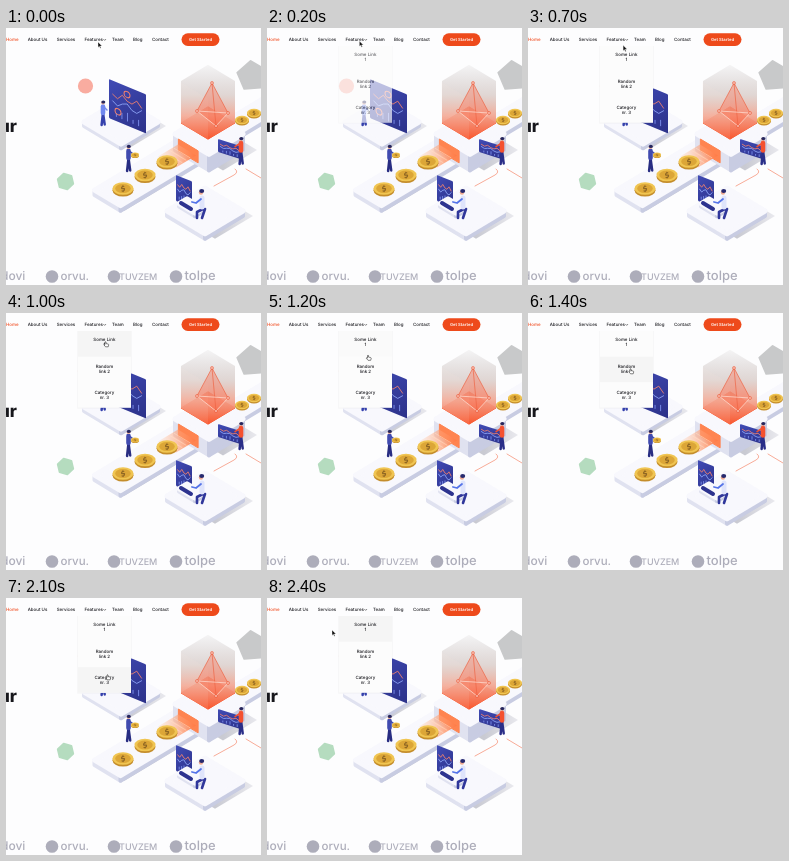
An HTML page for the animation above (2500 ms loop, 255 by 257 pixels).

```html
<!DOCTYPE html>
<html lang="en">
<head>
<meta charset="utf-8">
<title>Landing page menu</title>
<style>
  html, body { margin: 0; width: 100%; height: 100%; overflow: hidden; background: #fdfdfe; }
  svg { display: block; width: 100vw; height: 100vh; }
  text { font-family: Inter, "Open Sans", sans-serif; font-size: 4.45px; font-weight: 500; fill: #17171c; text-rendering: geometricPrecision; }
  .mid { text-anchor: middle; }
  .brand { fill: #adadba; font-weight: 500; }
</style>
</head>
<body>
<svg id="stage" viewBox="0 0 255 257" preserveAspectRatio="none">
  <defs>
    <linearGradient id="glow" x1="0" y1="0" x2="0" y2="1">
      <stop offset="0" stop-color="#b9b4b4" stop-opacity=".12"/>
      <stop offset=".4" stop-color="#cdbdb8" stop-opacity=".6"/>
      <stop offset=".68" stop-color="#f2a48f" stop-opacity=".9"/>
      <stop offset="1" stop-color="#f9572f"/>
    </linearGradient>
    <linearGradient id="heat">
      <stop offset="0" stop-color="#ffc9a8" stop-opacity=".2"/>
      <stop offset="1" stop-color="#ff7a45"/>
    </linearGradient>
    <linearGradient id="shade">
      <stop offset=".5" stop-color="#c9cad2"/>
      <stop offset="1" stop-color="#e9e9ee"/>
    </linearGradient>
    <linearGradient id="screen" x1="0" y1="0" x2="1" y2="1">
      <stop offset="0" stop-color="#414bb5"/>
      <stop offset="1" stop-color="#2b3189"/>
    </linearGradient>
  </defs>
  <g id="scene"></g>
  <g id="nav"></g>
  <g id="menu"></g>
  <g id="cursor">
    <path id="arrow" d="M0 0V5.4L1.3 4.3L2.2 6.3L3.1 5.9L2.2 4H4Z" fill="#111" stroke="#fff" stroke-width=".4"/>
    <path id="hand" transform="scale(.8)" d="M0 0Q.7-.7 1.3 0V2L4 2.6Q4.8 2.9 4.6 3.8L4 6H.7L-1.5 3.4Q-1.4 2.5-.6 2.8L0 3.3Z" fill="#fff" stroke="#222" stroke-width=".7"/>
  </g>
</svg>
<script>
const $ = id => document.getElementById(id);
const NS = "http://www.w3.org/2000/svg";
const SLOPE = .6;

function add(parent, tag, attrs, content) {
  const el = document.createElementNS(NS, tag);
  for (const key in attrs) el.setAttribute(key, attrs[key]);
  if (content) el.textContent = content;
  return parent.appendChild(el);
}
const scene = $("scene"), nav = $("nav"), menu = $("menu");
const range = n => [...Array(n).keys()];
const clamp = v => Math.max(0, Math.min(1, v));
const poly = (points, fill, round = 0) => add(scene, "polygon", {
  points: points.join(" "), fill, stroke: round ? fill : "none", "stroke-width": round, "stroke-linejoin": "round"
});
const line = (d, stroke, width = .6, parent = scene) => add(parent, "path", {
  d, stroke, "stroke-width": width, fill: "none", "stroke-linecap": "round", "stroke-linejoin": "round"
});
const dot = (cx, cy, rx, fill, ry = rx) => add(scene, "ellipse", { cx, cy, rx, ry, fill });
const label = (parent, x, y, content, more) => add(parent, "text", { x, y, ...more }, content);

// Isometric plane: u runs up to the right, v down to the right
const iso = (cx, cy, u, v) => [cx + u + v, cy + (v - u) * SLOPE];
const rhombus = (cx, cy, a, b = a) => [iso(cx, cy, -a, -b), iso(cx, cy, a, -b), iso(cx, cy, a, b), iso(cx, cy, -a, b)];
const lift = ([x, y], height) => [x, y - height];

function slab(cx, cy, a, b, depth, shadow = 0) {
  if (shadow) poly(rhombus(cx + shadow, cy + depth, a, b), "url(#shade)");
  const [left, , right, bottom] = rhombus(cx, cy, a, b);
  poly([left, bottom, lift(bottom, -depth), lift(left, -depth)], "#e0e2f0", 4);
  poly([right, bottom, lift(bottom, -depth), lift(right, -depth)], "#c8cce2", 4);
  poly(rhombus(cx, cy, a, b), "#f8f8fd", 5);
}

function blob(cx, cy, r, sides, turn, fill) {
  poly(range(sides).map(i => {
    const angle = turn + i * 2 * Math.PI / sides;
    return [cx + r * Math.cos(angle), cy + r * Math.sin(angle)];
  }), fill, 2);
}

function person(x, y, height, shirt, trousers, reach = -4) {
  const hip = y - height * .48, neck = y - height * .8;
  line(`M${x} ${hip}L${x - 1.4} ${y}M${x} ${hip}L${x + 1.7} ${y - .6}`, trousers, 2.5);
  line(`M${x} ${neck + 1.5}V${hip}`, shirt, 4.6);
  line(`M${x} ${neck + 1}l${reach} 4`, shirt, 1.5);
  dot(x, neck - 2.2, 1.8, "#f0aa91");
  dot(x + .3, neck - 3, 2, "#26275f", 1.6);
}

function coin(x, y, r = 10.5) {
  dot(x, y + r * .17, r, "#c48d2b", r * .6);
  dot(x, y, r, "#f0c552", r * .6);
  dot(x, y, r * .74, "#dca637", r * .43);
  add(scene, "text", {
    class: "mid", y: r * .26, transform: `translate(${x} ${y}) rotate(-28) skewX(-15)`,
    style: `font-size:${r * .7}px;font-weight:700;fill:#8c6423`
  }, "$");
}

// Upright screen with a wave chart and bars
function screen(x, y, w, h, slope) {
  const g = add(scene, "g", { transform: `matrix(1 ${slope} 0 1 ${x} ${y})` });
  add(g, "rect", { width: w, height: h, rx: 1, fill: "url(#screen)" });
  const wave = (level, speed) => "M" + range(7).map(i =>
    [w * (.1 + i * .13), h * (level + .08 * Math.sin(i * speed))]).join("L");
  line(wave(.35, 2.2), "#f0806f", .8, g);
  line(wave(.52, 1.7), "#8ea5f6", .8, g);
  range(5).forEach(i => line(`M${w * (.2 + i * .15)} ${h * .88}v${-h * (.08 + i % 3 * .06)}`, "#7f92ee", .8, g));
  return g;
}

function buildMachine() {
  slab(203, 106, 17, 17, 16, 14);
  const [left, , , bottom] = rhombus(203, 106, 17);
  const along = t => [left[0] + (bottom[0] - left[0]) * t, left[1] + (bottom[1] - left[1]) * t + 3];
  poly([along(.1), along(.68), lift(along(.68), -12), lift(along(.1), -12)], "#ff8450", 1);
  poly(rhombus(171, 128, 10, 9), "url(#heat)");
  range(4).forEach(i => {
    const step = -7 + i * 4;
    line(`M${iso(171, 128, step, -8)}L${iso(171, 128, step, 8)}`, "#ffe0cb", .5);
  });

  // Glowing prism with a wire crystal
  const base = rhombus(202, 95, 13.5);
  const [west, north, east, south] = base;
  poly(base, "#fb6038", 1);
  poly([west, lift(west, 42), lift(north, 42), lift(east, 42), east, south], "url(#glow)");
  range(14).forEach(i => line(`M${iso(202, 95, -13.5, i * 2 - 13.5)}v-40`, "#ffe7de", .2));
  const nodes = [[206, 55], [191, 83], [210, 98], [222, 85]];
  poly(nodes, "#ff4f2b").setAttribute("fill-opacity", .3);
  nodes.forEach((a, i) => nodes.slice(i + 1).forEach(b => line(`M${a}L${b}`, i ? "#ffe1d6" : "#ee6546", .7)));
  nodes.forEach(([x, y]) => { dot(x, y, 1.7, "#ed6041"); dot(x, y, .8, "#fff"); });
}

function buildScene() {
  blob(246, 48, 15, 5, -1.66, "#c8c9ca");
  blob(59.5, 153.5, 8, 6, -1.8, "#b5dcbf");
  dot(79.5, 58, 7.6, "#f9aca0");

  slab(115, 94, 18.5, 18.5, 4, 8);
  const board = screen(103, 51, 37, 39, .42);
  range(2).forEach(i => add(board, "circle", { cx: 9 + i * 9, cy: 29 - i * 21, r: 3, fill: "none", stroke: "#f0806f", "stroke-width": 1 }));
  person(97, 97, 25, "#7087ee", "#3541ad", 4);

  slab(246, 87, 22, 8, 5);
  range(2).forEach(i => coin(236 + i * 12, 92 - i * 7, 7));

  slab(143, 145, 41.5, 13, 5, 4);
  buildMachine();
  range(3).forEach(i => coin(117 + i * 22, 160.5 - i * 13.5));
  person(122.5, 143, 27, "#414baf", "#282d82", 5);
  coin(129, 127, 4);

  screen(212, 111, 24, 13, .32);
  person(235, 136, 28, "#f4512f", "#2a2e88", -6);
  line("M208 158L228 147Q233 144 229 141M240 141L255 150", "#f5886c", .7);

  slab(199, 183, 19, 19, 5, 10);
  screen(170, 147, 16, 26, .4);
  slab(185, 178, 4, 8, 3);
  line("M175 175L185 181", "#2d338f", 4);
  line("M197 181L191 184V190M199 181L196 190", "#30379b", 2.6);
  line("M196 170V179", "#dfe4fb", 5);
  line("M195 171L190 175L186 174", "#5574e8", 1.8);
  dot(195, 164.5, 2.2, "#efaa91");
  dot(195.7, 163, 2.5, "#26296f", 2.1);
}

function buildPage() {
  label(nav, 11, 103.5, "ur", { "text-anchor": "end", style: "font-size:17px;font-weight:800" });
  [["Home", 0], ["About Us", 21.7], ["Services", 50.7], ["Features", 78.5], ["Team", 106], ["Blog", 127], ["Contact", 146]]
    .forEach(([name, x], i) => label(nav, x, 13.2, name, i ? {} : { style: "fill:#f04e23" }));
  line("M97.6 11.3l1.1 1.1l1.1-1.1", "#333", .6, nav);
  add(nav, "rect", { x: 175.5, y: 5.3, width: 38, height: 12.6, rx: 6.3, fill: "#ee4a1b" });
  label(nav, 194.5, 13.1, "Get Started", { class: "mid", style: "fill:#fff;font-size:4.2px;font-weight:600" });

  [["dovi", -5, 12], ["orvu.", 54.5, 11.5], ["TUVZEM", 113, 9], ["tolpe", 178.5, 13]]
    .forEach(([name, x, size]) => label(nav, x, 252.3, name, { class: "brand", style: `font-size:${size}px` }));
  range(3).forEach(i => add(nav, "circle", { cx: 46 + i * 62, cy: 248.5, r: 6.3, fill: "#adadba" }));
}

const ROW = 25.6, TOP = 18;
const rowMid = i => TOP + ROW * (i + .5);
let rows;
function buildMenu() {
  range(3).forEach(i => add(menu, "rect", {
    x: 72 - i * .5, y: TOP, width: 53 + i, height: ROW * 3 + i * .6, fill: "#000", opacity: .015
  }));
  add(menu, "rect", { x: 72, y: TOP, width: 53, height: ROW * 3, fill: "#fcfcfc" });
  rows = ["Some Link/1", "Random/link 2", "Category/nr. 3"].map((title, i) => {
    const row = add(menu, "rect", { x: 72, y: TOP + ROW * i, width: 53, height: ROW, fill: "#f5f5f5" });
    title.split("/").forEach((part, n) => label(menu, 98.4, 28.1 + i * 26.6 + n * 5, part, { class: "mid" }));
    return row;
  });
}

// Pointer stops: time, x, y
const stops = [[0, 92, 14], [500, 93, 11], [1000, 99, 29], [1400, 102, 56], [1700, 102.5, 82], [2100, 101, 77], [2400, 65, 32], [2500, 65, 32]];

function pointer(t) {
  const i = stops.findIndex(stop => stop[0] > t);
  const [t0, x0, y0] = stops[i - 1], [t1, x1, y1] = stops[i];
  const p = (t - t0) / (t1 - t0), ease = p * p * (3 - 2 * p);
  return [x0 + (x1 - x0) * ease, y0 + (y1 - y0) * ease];
}

function draw(now) {
  const t = Math.floor(now % 2500 / 100) * 100;
  const [x, y] = pointer(t);
  menu.setAttribute("opacity", clamp(t / 300));
  rows.forEach((row, i) => row.setAttribute("opacity", clamp((ROW / 2 - Math.abs(y - rowMid(i))) / 4)));
  const overLink = y > TOP && x > 72;
  $("cursor").setAttribute("transform", `translate(${x} ${y})`);
  $("arrow").setAttribute("visibility", overLink ? "hidden" : "visible");
  $("hand").setAttribute("visibility", overLink ? "visible" : "hidden");
}

buildScene();
buildPage();
buildMenu();
const start = performance.now();
function tick() {
  draw(performance.now() - start);
  requestAnimationFrame(tick);
}
tick();
</script>
</body>
</html>
```
